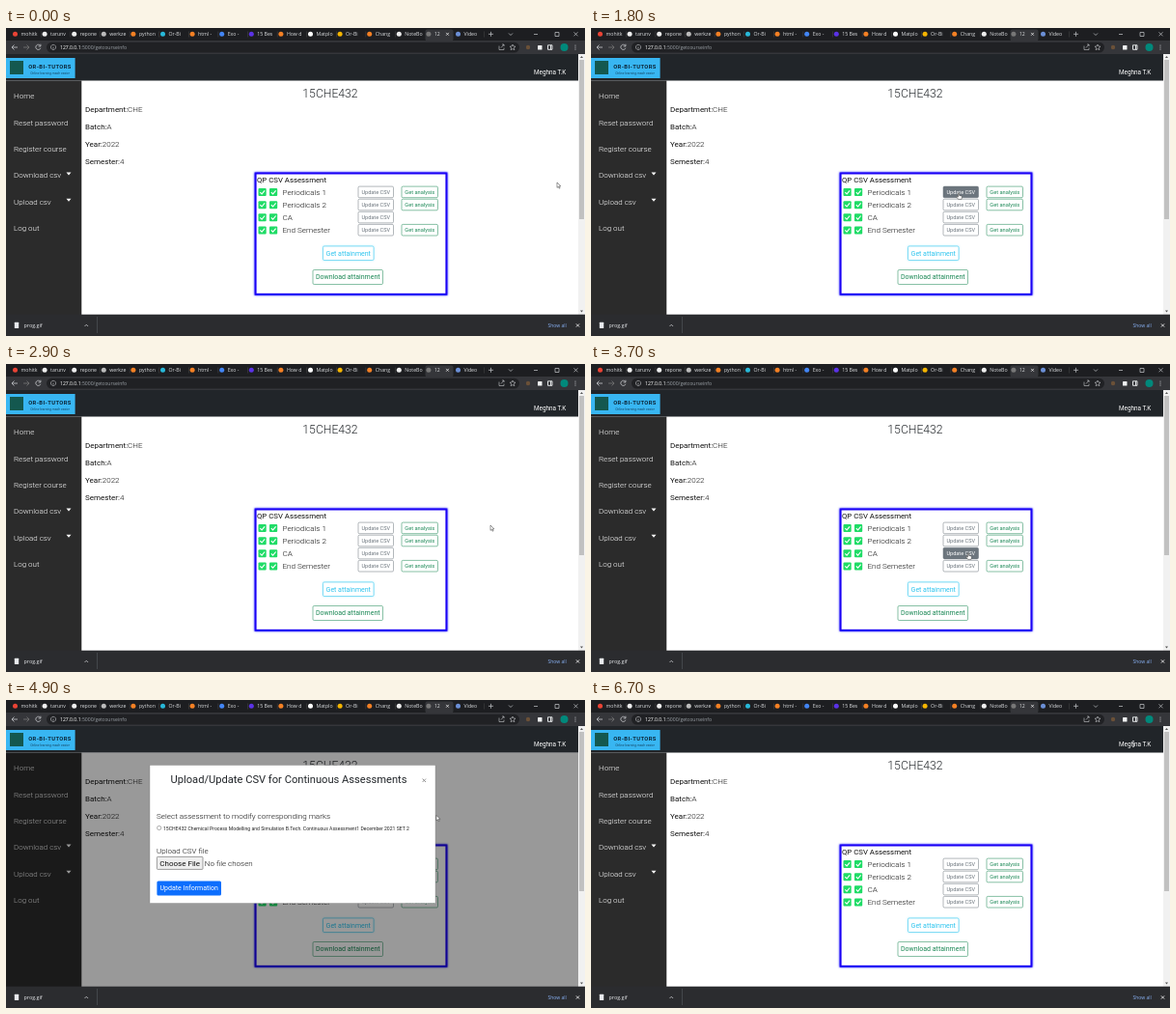
Animation, 600 px wide and 319 px high, one loop 6800 ms. Source, as an HTML page:

```html
<!DOCTYPE html>
<html lang="en">
<head>
<meta charset="utf-8">
<title>Course info</title>
<style>
html, body { margin: 0; width: 100%; height: 100%; overflow: hidden; background: #fff; }
svg { display: block; width: 600px; height: 319px; }
text { font-family: Roboto, "Open Sans", sans-serif; white-space: pre; }
.ui { font-family: "Open Sans", "Noto Sans", sans-serif; }
.btn rect { fill: #fff; stroke: var(--c); stroke-width: .7; stroke-opacity: .75; }
.btn text { fill: var(--c); }
.btn.hover rect { fill: var(--c); }
.btn.hover text { fill: #fff; }
</style>
</head>
<body>
<svg id="stage" viewBox="0 0 600 319"></svg>
<script>
const LOOP = 6800, STEP = 100;
const stage = document.getElementById('stage');

function add(parent, tag, attrs, content) {
  const el = document.createElementNS('http://www.w3.org/2000/svg', tag);
  for (const k in attrs) el.setAttribute(k, attrs[k]);
  if (content) el.textContent = content;
  parent.append(el);
  return el;
}
const group = (attrs, parent = stage) => add(parent, 'g', attrs);
const rect = (p, x, y, width, height, fill, more) =>
  add(p, 'rect', { x, y, width, height, fill, ...more });
const line = (p, d, stroke, w = .8, more) =>
  add(p, 'path', { d, stroke, 'stroke-width': w, fill: 'none', ...more });
const dot = (p, cx, cy, r, fill) => add(p, 'circle', { cx, cy, r, fill });
// y is the middle of the capitals
const label = (p, x, y, size, fill, str, more) =>
  add(p, 'text', { x, y: y + size * .355, 'font-size': size, fill, ...more }, str);
const middle = { 'text-anchor': 'middle' }, light = { 'font-weight': 300 };
const cross = (p, x, y, r, color, w) =>
  line(p, `M${x - r} ${y - r}l${2 * r} ${2 * r}m0 ${-2 * r}l${-2 * r} ${2 * r}`, color, w);

const buttons = [];
function button(p, x, y, w, h, size, color, str) {
  const g = group({ class: 'btn', style: `--c:${color}` }, p);
  rect(g, x, y, w, h, '', { rx: 1.3 });
  label(g, x + w / 2, y + h / 2, size, '', str, middle);
  buttons.push({ g, x, y, w, h });
  return g;
}

function drawPage() {
  const g = group({});
  rect(g, 0, 27, 600, 270, '#fff');
  label(g, 336, 67.5, 12.2, '#212529', '15CHE432', { ...middle, ...light });
  [['Department:', 'CHE'], ['Batch:', 'A'], ['Year:', '2022'], ['Semester:', '4']].forEach(([key, value], i) => {
    const t = label(g, 82, 84.3 + i * 18, 8, '#111', '');
    add(t, 'tspan', {}, key);
    add(t, 'tspan', light, value);
  });

  rect(g, 258.6, 150.5, 197.8, 125.3, '#fff',
    { stroke: '#1a00f5', 'stroke-width': 2, style: 'filter:drop-shadow(0 0 1.3px #22f)' });
  label(g, 260, 157.3, 7.8, '#111', 'QP CSV Assessment');
  ['Periodicals 1', 'Periodicals 2', 'CA', 'End Semester'].forEach((name, i) => {
    const y = 170.1 + i * 13.1;
    for (const x of [261.5, 273]) {
      rect(g, x, y - 4, 8.2, 8, '#1fdc66', { rx: 1 });
      line(g, `M${x + 1.8} ${y}l1.8 1.8 3-3.6`, '#fff', 1.1);
    }
    label(g, 286.5, y, 8.1, '#111', name, light);
    button(g, 365, y - 6, 36.5, 11.6, 5.6, '#6c757d', 'Update CSV');
    if (i !== 2) button(g, 410, y - 6, 37.5, 11.6, 5.7, '#198754', 'Get analysis');
  });
  button(g, 328.5, 226, 52.5, 14.5, 7, '#2cc4ee', 'Get attainment')
    .setAttribute('filter', 'drop-shadow(0 0 .8px #9de8fa)');
  button(g, 318, 250.5, 72.5, 15, 7, '#198754', 'Download attainment');

  rect(g, 0, 54.5, 78.3, 242.5, '#2b2b2b');
  ['Home', 'Reset password', 'Register course', 'Download csv', 'Upload csv', 'Log out'].forEach((name, i) => {
    const y = 70.5 + i * 27.3;
    label(g, 8, y, 8, '#fff', name, light);
    if (/csv/.test(name)) add(g, 'path', { d: `M62.5 ${y - 3}h5l-2.5 3z`, fill: '#fff' });
  });
}

function drawModal(title, height, extra) {
  const g = group({});
  rect(g, 0, 54.5, 593, 242.5, '#000', { opacity: .4 });
  rect(g, 149, 67.5, 296, height, '#fff', { stroke: '#888', 'stroke-width': .4 });
  label(g, 293, 81.7, 11.15, '#212529', title, middle);
  cross(g, 433.3, 83.3, 1.7, '#888', .9);
  if (extra) {
    label(g, 156, 120.5, 8.1, '#111', 'Select assessment to modify corresponding marks', light);
    add(g, 'circle', { cx: 158.7, cy: 132.5, r: 2.1, fill: '#fff', stroke: '#777', 'stroke-width': .6 });
    label(g, 163, 132.8, 5.12, '#222', extra);
  }
  const y = extra ? 156 : 120.8;
  label(g, 156, y, 8, '#111', 'Upload CSV file', light);
  rect(g, 156.4, y + 6.4, 47.6, 13, '#efefef', { stroke: '#777', 'stroke-width': .7, rx: .8 });
  label(g, 180.2, y + 13, 8, '#111', 'Choose File', middle);
  label(g, 205.8, y + 13, 8, '#111', 'No file chosen', light);
  rect(g, 156.4, y + 31.6, 66.6, 14.8, '#0d6efd', { rx: 1.5 });
  label(g, 189.7, y + 39, 7, '#fff', 'Update Information', middle);
  return g;
}

function drawHeader() {
  const g = group({});
  rect(g, 0, 27, 593, 27.5, '#212529');
  rect(g, 0, 31, 71.6, 21, '#38b6f2');
  rect(g, 4, 34, 14, 14, '#14584f');
  label(g, 45.5, 40, 5.8, '#0c2436', 'OR-BI-TUTORS', { ...middle, 'font-weight': 700, 'letter-spacing': .4 });
  label(g, 45.5, 46.3, 3.4, '#174a68', 'Online learning made easier', { ...middle, 'font-style': 'italic' });
  label(g, 547, 45.5, 6.4, '#fff', 'Meghna T.K');
  rect(g, 593, 27, 7, 270, '#f1f1f1');
  rect(g, 594, 33, 5, 165, '#c1c1c1');
  add(g, 'path', { d: 'M595 31l1.5-2 1.5 2zM595 292.5l1.5 2 1.5-2z', fill: '#555' });
}

function drawBrowser() {
  const g = group({}), grey = '#c8cacd';
  rect(g, 0, 0, 600, 13, '#1d1e21');
  rect(g, 434.5, 1.5, 29, 12, '#35363a', { rx: 2 });
  const tabs = [
    ['mohitk', '#ea4335'], ['tarunv', '#eee'], ['reponest', '#eee'], ['werkzeug', '#bbb'],
    ['python', '#f48024'], ['Or-Bi', '#28b8d8'], ['html - f', '#f48024'], ['Exo - D', '#4285f4'],
    ['15 Best', '#5b32e6'], ['How d', '#f48024'], ['Matplo', '#fff'], ['Or-Bi', '#f4b400'],
    ['Chang', '#f48024'], ['NoteBo', '#eee'], ['12', '#777'], ['Video t', '#6b8fd6']
  ];
  tabs.forEach(([name, color], i) => {
    const x = 15.5 + i * 30.6;
    dot(g, x - 6, 6.3, 2.5, color);
    label(g, x, 6.3, 5.2, '#dcdee0', name.slice(0, 6), { class: 'ui' });
    if (i !== 13 && i !== 14) rect(g, x + 20.6, 3.5, .4, 6, '#555');
  });
  cross(g, 457.5, 6.3, 1.4, '#fff', .7);
  line(g, 'M500 6.3h5m-2.5-2.5v5M521 5.5l2 2 2-2M547 6.5h4M569 4.5h4v4h-4z', grey, .7);
  cross(g, 590.5, 6.3, 2, grey, .7);

  rect(g, 0, 13, 600, 14, '#35363a');
  rect(g, 42, 14.7, 490, 10.8, '#202124', { rx: 5.4 });
  line(g, 'M12 20h-6m2.5-2.5L6 20l2.5 2.5', grey, .8);
  line(g, 'M18 20h6m-2.5-2.5L24 20l-2.5 2.5', '#777', .8);
  line(g, 'M35.5 18.2a2.6 2.6 0 1 0 .4 2.5m0-4v2.3h-2.3', grey, .8);
  line(g, 'M49 17.3a2.6 2.6 0 1 0 .1 0M49 19.5v2', grey, .6);
  const url = label(g, 56, 20, 5.1, '#fff', '', { class: 'ui' });
  add(url, 'tspan', {}, '127.0.0.1');
  add(url, 'tspan', { fill: '#9aa0a6' }, ':5000/getcourseinfo');
  line(g, 'M511 18.5v4h5v-2m-3 0l3-3.5m-2 0h2v2M525 17l.9 2 2.1.2-1.6 1.4.5 2.1-1.9-1.1-1.9 1.1.5-2.1-1.6-1.4 2.1-.2z', grey, .6);
  dot(g, 541, 20, 2.2, '#6b5138');
  rect(g, 551, 18, 4.5, 4.5, '#f1f3f4', { rx: .6 });
  line(g, 'M561.5 17.8h4.5v4.5h-4.5zM564.5 17.8v4.5', '#f1f3f4', .9);
  dot(g, 578.5, 20, 4, '#00897b');
  for (const y of [18, 20, 22]) dot(g, 590, y, .6, grey);

  rect(g, 0, 296.7, 600, 22.3, '#2b2c2f');
  rect(g, 8.8, 304.8, 4.4, 6.2, '#e8eaed', { rx: .5 });
  label(g, 18.5, 308, 5.4, '#e8eaed', 'prog.gif', { class: 'ui' });
  line(g, 'M81.5 309l1.8-1.8 1.8 1.8', grey, .8);
  rect(g, 94, 299, .5, 17, '#5f6368');
  label(g, 561.5, 308, 5, '#8ab4f8', 'Show all', { class: 'ui' });
  cross(g, 592.5, 308, 1.6, '#fff', .8);
}

drawPage();
const modals = [
  { from: 1900, to: 2900, g: drawModal('Upload/Update CSV for Periodical 1', 107.5) },
  { from: 3900, to: 5900, g: drawModal('Upload/Update CSV for Continuous Assessments', 143,
    '15CHE432 Chemical Process Modelling and Simulation B.Tech. Continuous Assessment1 December 2021 SET 2') }
];
drawHeader();
drawBrowser();

const cursor = group({});
const shape = (d, attrs) => add(cursor, 'path',
  { d, fill: '#fff', stroke: '#333', 'stroke-width': .5, 'stroke-linejoin': 'round', ...attrs });
const pointers = {
  arrow: shape('M0 0v5.4l1.3-1.2.9 2 .9-.4-.9-1.9h1.7z'),
  hand: shape('M-.6 0q.6-.6 1.2 0v2.4l2.4.6q.6.2.5 1l-.5 2.4h-3.4l-2-2.6q.2-.8 1-.4l.8.6z'),
  beam: shape('M-1 -3h2m-1 0v6m-1 0h2', { stroke: '#fff' })
};

// time, x, y of the pointer
const path = [
  [0, 571, 160], [300, 571, 160], [1500, 381, 171], [1800, 381, 171], [1900, 379, 170.5],
  [2200, 379, 170.5], [2800, 502, 167], [2900, 502, 167], [3600, 385, 196], [3800, 397, 196],
  [4300, 397, 196], [4900, 446, 119.5], [5500, 520, 128], [5900, 520, 128], [6700, 562, 45.5]
];
function pointerAt(t) {
  const i = Math.max(1, path.findIndex(p => p[0] >= t));
  const [t0, x0, y0] = path[i - 1], [t1, x1, y1] = path[i];
  const k = (t - t0) / (t1 - t0), e = k * k * (3 - 2 * k);
  return [x0 + (x1 - x0) * e, y0 + (y1 - y0) * e];
}

function render(now) {
  const t = Math.floor(now % LOOP / STEP) * STEP;
  const [x, y] = pointerAt(t);
  let open = false, kind = 'arrow';
  for (const m of modals) {
    const on = t >= m.from && t < m.to;
    m.g.style.display = on ? '' : 'none';
    open = open || on;
  }
  for (const b of buttons) {
    const over = !open && x > b.x && x < b.x + b.w && y > b.y && y < b.y + b.h;
    b.g.classList.toggle('hover', over);
    if (over) kind = 'hand';
  }
  if (x > 547 && y > 41 && y < 50) kind = 'beam';
  for (const k in pointers) pointers[k].style.display = k === kind ? '' : 'none';
  cursor.setAttribute('transform', `translate(${x} ${y})`);
}
const start = performance.now();
function tick() {
  render(performance.now() - start);
  requestAnimationFrame(tick);
}
tick();
</script>
</body>
</html>
```
